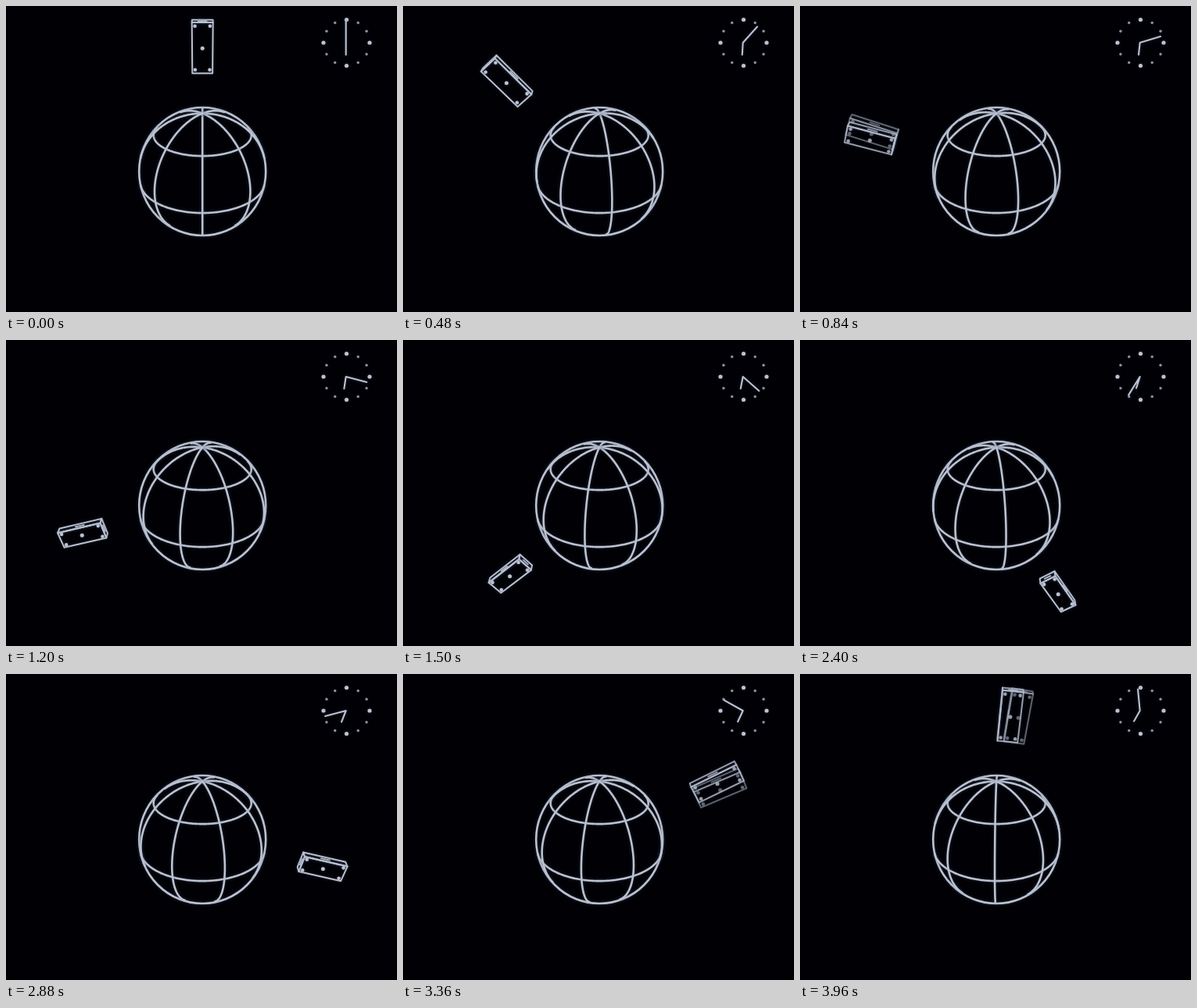
These frames come from a looping animation (500 px wide and 392 px high, 4020 ms). An HTML page with a canvas:

```html
<!DOCTYPE html>
<html lang="en">
<head>
<meta charset="utf-8">
<title>Satellite orbit</title>
<style>
  html, body { margin: 0; width: 100%; height: 100%; overflow: hidden; background: #000005; }
  canvas { display: block; filter: blur(.55px); }
</style>
</head>
<body>
<canvas id="stage" width="500" height="392"></canvas>
<script>
const ctx = document.getElementById('stage').getContext('2d');
const { sin, cos, PI } = Math;
const rad = d => d * PI / 180;

const STEP = 60, STEPS = 67;
const CX = 251.2, CY = 212;
const TILT = rad(29), ST = sin(TILT), CT = cos(TILT);
const CAM = 9;                                  // camera distance in globe radii
const FOCAL = 81 * Math.sqrt(CAM * CAM - 1);
const ORBIT = 2.02;
const HALF = [.365, .145, .07];                 // satellite: radial, tangential, depth
const INK = '#bcc2ce';

// Tilts a point towards the viewer; returns screen x, y and depth.
function project(x, y, z) {
  const depth = y * ST + z * CT;
  const k = FOCAL / (CAM - depth);
  return [CX + x * k, CY - (y * CT - z * ST) * k, depth];
}

function stroke(points, width) {
  ctx.lineWidth = width;
  ctx.beginPath();
  points.forEach(p => ctx.lineTo(p[0], p[1]));
  ctx.stroke();
}

function dot([x, y], r) {
  ctx.beginPath();
  ctx.arc(x, y, r, 0, 2 * PI);
  ctx.fill();
}

// Draws the part of a sphere curve that lies on the near side.
function sphereCurve(at, from, to) {
  ctx.beginPath();
  let drawing = false;
  for (let d = from; d <= to; d++) {
    const [lat, lon] = at(rad(d));
    const p = project(cos(lat) * sin(lon), sin(lat), cos(lat) * cos(lon));
    const visible = p[2] > 1 / CAM;
    if (visible) drawing ? ctx.lineTo(p[0], p[1]) : ctx.moveTo(p[0], p[1]);
    drawing = visible;
  }
  ctx.stroke();
}

function globe(phase) {
  ctx.lineWidth = 2.6;
  ctx.beginPath();
  ctx.ellipse(CX, CY, 81, 82, 0, 0, 2 * PI);
  ctx.stroke();
  for (const lat of [41.7, -8]) sphereCurve(a => [rad(lat), a], -180, 180);
  for (let lon = 0; lon < 360; lon += 45)
    sphereCurve(a => [a, rad(lon) + phase * PI / 2], -90, 90);
}

function satellite(phase, alpha) {
  const th = phase * 2 * PI, s = sin(th), c = cos(th);
  const place = (a, b, n) =>
    project(-s * (ORBIT + a) + c * b, c * (ORBIT + a) + s * b, n);
  const eye = [CAM * ST * c - ORBIT, CAM * ST * s, CAM * CT];
  ctx.globalAlpha = alpha;

  for (let axis = 0; axis < 3; axis++) {
    const side = Math.sign(eye[axis]);
    if (Math.abs(eye[axis]) <= HALF[axis]) continue;
    const [i, j] = [0, 1, 2].filter(k => k !== axis);
    const on = (u, v) => {
      const q = [];
      q[axis] = side * HALF[axis];
      q[i] = u * HALF[i];
      q[j] = v * HALF[j];
      return place(...q);
    };
    stroke([on(-1, -1), on(1, -1), on(1, 1), on(-1, 1), on(-1, -1), on(1, -1)], 2);

    if (axis === 2) {
      dot(on(0, 0), 2.5);
      for (const u of [-.86, .86])
        for (const v of [-.72, .72]) dot(on(u, v), 2.3);
    } else {
      const w = axis ? .2 : .4;
      stroke([on(-w, 0), on(w, 0)], 1.8);
    }
  }
  ctx.globalAlpha = 1;
}

function clock(phase) {
  const x = 435.5, y = 47;
  for (let h = 0; h < 12; h++) {
    const a = h * PI / 6, quarter = h % 3 === 0;
    ctx.globalAlpha = quarter ? 1 : .75;
    dot([x + 29.5 * sin(a), y - 29.5 * cos(a)], quarter ? 2.6 : 1.7);
  }
  ctx.globalAlpha = 1;
  const tip = (a, r) => [x - .8 + r * sin(a), y - r * cos(a)];
  stroke([tip(phase * 2 * PI, 27.5), [x - .8, y], tip(PI + phase * PI / 6, 15.5)], 2.1);
}

function draw() {
  const step = Math.floor(performance.now() / STEP) % STEPS;
  const linear = step / STEPS;
  const phase = linear - .009 * sin(linear * PI);   // starts slightly slow, ends slightly fast
  ctx.shadowBlur = 0;
  ctx.fillStyle = '#000005';
  ctx.fillRect(0, 0, 500, 392);
  ctx.strokeStyle = ctx.fillStyle = INK;
  ctx.lineJoin = ctx.lineCap = 'round';
  ctx.shadowColor = 'rgba(80, 100, 140, .4)';
  ctx.shadowBlur = 4;

  globe(phase);
  clock(phase);

  // Film cadence: two steps in five blend with the preceding pose.
  const blended = step % 5 === 1 || step % 5 === 4;
  if (blended) satellite(phase - .6 / STEPS, .5);
  satellite(phase, blended ? .8 : 1);
  requestAnimationFrame(draw);
}
draw();
</script>
</body>
</html>
```
